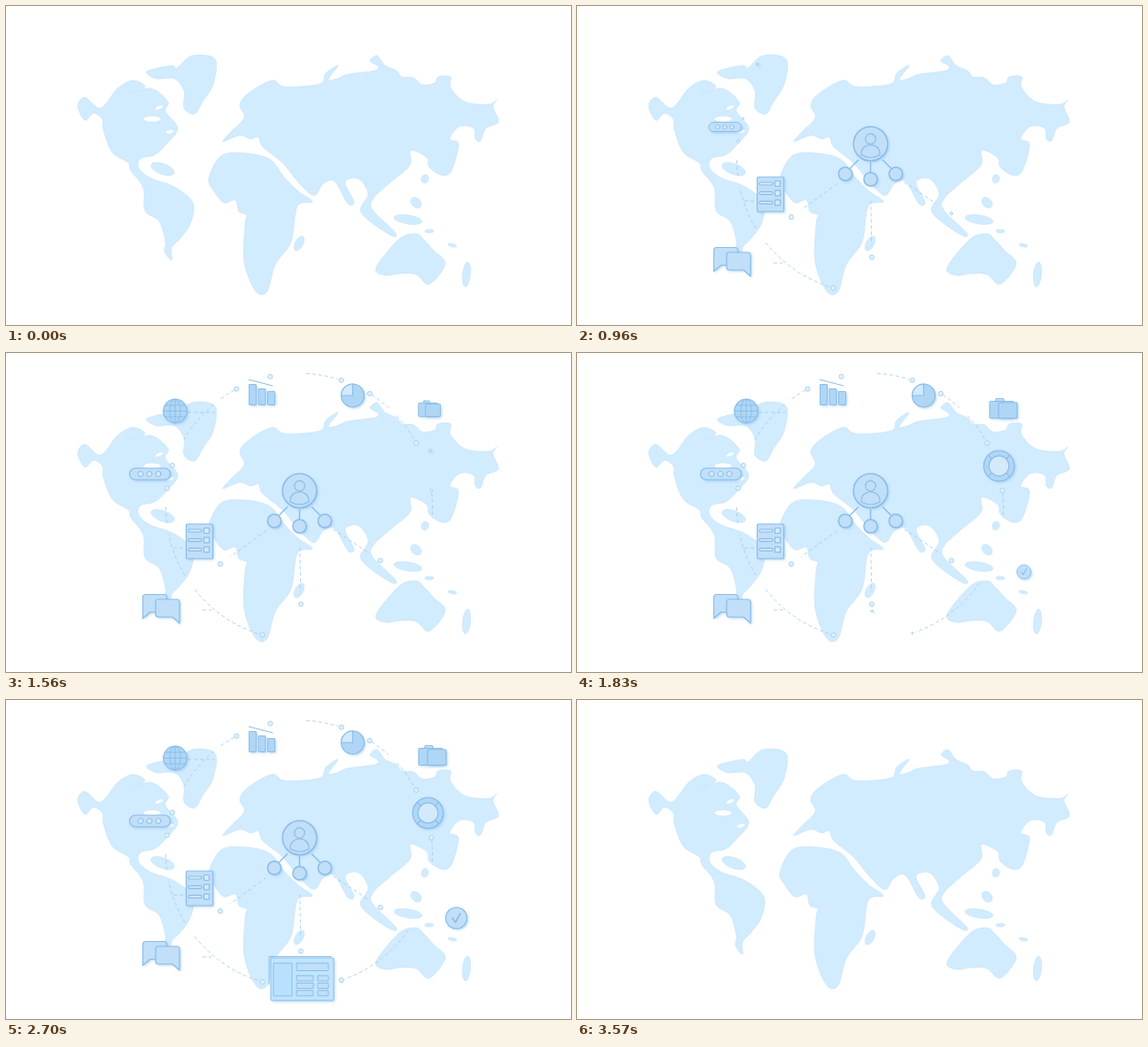
These frames come from a looping animation (638x360 px, 3600 ms). An HTML page with a canvas:

```html
<!DOCTYPE html>
<html lang="en">
<head>
<meta charset="utf-8">
<title>Connected world</title>
<style>
  html, body { margin: 0; width: 100%; height: 100%; overflow: hidden; background: #fff; }
  canvas { display: block; width: 638px; height: 360px; }
</style>
</head>
<body>
<canvas id="stage" width="638" height="360"></canvas>
<script>
const ctx = document.getElementById("stage").getContext("2d");
const LOOP = 3600, FIRST = 84, STEP = 150, GROW = 440, LEAVE = 3073;
const LAND = "#d1ebff", COAST = "#c6e2f7", EDGE = "#8abde8", LINK = "#a6cdec";
const FILL = "#c1dff8", DEEP = "#b0d6f6", PALE = "#d3eafc";

const clamp = v => Math.max(0, Math.min(1, v));
const easeInOut = p => p < 0.5 ? 4 * p ** 3 : 1 - 4 * (1 - p) ** 3;
const progress = (t, start, length) => easeInOut(clamp((t - start) / length));

// Key points of each coast, joined by a smooth closed curve.
const lands = [
  `245,153 254,142 269,126 264,112 273,99 300,84 315,91 354,88 361,76 375,67 364,83 374,82 386,77 416,73 420,68
   411,62 419,56 428,67 441,73 447,80 460,81 470,89 484,87 488,80 502,80 502,92 518,108 545,111 554,106 550,114
   556,131 542,138 536,152 530,150 528,138 512,136 501,150 511,156 503,186 492,191 478,182 475,171 457,163 456,180
   433,200 415,217 414,230 440,256 433,258 401,233 409,212 398,195 383,199 393,221 386,223 371,198 358,201 348,214
   332,201 312,177 290,159 285,148 276,150 264,146`,
  `187,287 179,277 180,266 173,243 157,231 155,205 141,186 138,177 120,165 110,140 109,128 99,121 89,129 81,113
   89,103 104,115 113,110 126,93 143,84 157,91 140,99 164,93 183,108 180,119 194,138 181,156 168,168 152,172
   150,183 163,194 190,204 211,222 208,246 196,263 187,273`,
  "159,74 187,67 193,70 210,56 236,60 234,88 222,108 213,122 201,115 201,96 190,82 170,82",
  `229,195 243,169 270,166 298,173 314,193 330,209 346,221 329,226 322,266 304,292 295,322 282,322 269,289
   270,246 272,236 263,232 259,219 246,222 235,209`,
  "418,295 444,263 463,257 472,264 483,276 496,291 478,314 463,303 445,302 428,304"
].map(smoothPath);
// Ellipses: x, y, radii, tilt
const islands = [
  [177, 184, 14, 6, 0.35], [331, 268, 4.5, 9, 0.5], [520, 303, 4.5, 14, 0.1], [454, 241, 16, 5, 0.15],
  [463, 222, 7, 5, 0.8], [473, 195, 4, 5, 0.3], [478, 254, 5, 2, 0], [504, 270, 5, 1.8, 0.2]
].map(ovalPath);
const lakes = [[165, 127.5, 10, 3.5, 0], [173, 114.5, 5, 2.2, -0.4], [185, 142, 5, 2.2, -0.2]].map(ovalPath);

function smoothPath(text) {
  const points = text.split(/\s+/).map(pair => pair.split(",").map(Number));
  const n = points.length, path = new Path2D();
  const at = i => points[(i + n) % n];
  path.moveTo(...at(0));
  for (let i = 0; i < n; i++) {
    const [a, b, c, d] = [at(i - 1), at(i), at(i + 1), at(i + 2)];
    path.bezierCurveTo(b[0] + (c[0] - a[0]) / 6, b[1] + (c[1] - a[1]) / 6,
      c[0] - (d[0] - b[0]) / 6, c[1] - (d[1] - b[1]) / 6, c[0], c[1]);
  }
  path.closePath();
  return path;
}
function ovalPath([x, y, rx, ry, tilt]) {
  const path = new Path2D();
  path.ellipse(x, y, rx, ry, tilt, 0, 7);
  return path;
}

function drawMap() {
  ctx.lineWidth = 0.6;
  ctx.strokeStyle = COAST;
  for (const [paths, colour] of [[lands, LAND], [islands, LAND], [lakes, "#fff"]]) {
    ctx.fillStyle = colour;
    for (const path of paths) { ctx.fill(path); ctx.stroke(path); }
  }
}

// Shape helpers
function paint(fill, shadow) {
  if (fill) {
    ctx.save();
    if (shadow) {
      ctx.shadowColor = "rgba(110,175,230,.5)";
      ctx.shadowBlur = 3;
      ctx.shadowOffsetX = ctx.shadowOffsetY = 1.5;
    }
    ctx.fillStyle = fill;
    ctx.fill();
    ctx.restore();
  }
  ctx.stroke();
}
function disc(x, y, r, fill, shadow) {
  ctx.beginPath();
  ctx.arc(x, y, r, 0, 7);
  paint(fill, shadow);
}
function box(x, y, w, h, r, fill, shadow) {
  ctx.beginPath();
  ctx.roundRect(x, y, w, h, r);
  paint(fill, shadow);
}
function stroke(...xy) {
  ctx.beginPath();
  for (let i = 0; i < xy.length; i += 2) ctx.lineTo(xy[i], xy[i + 1]);
  ctx.stroke();
}

function drawTeam() {
  ctx.lineWidth = 1.5;
  for (const side of [-1, 0, 1]) {
    const x = 331.5 + side * 28.5, y = side ? 189.5 : 195.5;
    stroke(331.5 + side * 14, side ? 174 : 177, x - side * 6, y - 7);
    disc(x, y, 7.6, FILL, true);
  }
  disc(331.5, 155.5, 19.3, FILL, true);
  ctx.lineWidth = 1.2;
  disc(331.5, 150, 5.8);
  ctx.beginPath();
  ctx.moveTo(321, 168);
  ctx.bezierCurveTo(320, 153, 343, 153, 342, 168);
  ctx.quadraticCurveTo(331.5, 174, 321, 168);
  ctx.stroke();
}
function bubble(x, y, flip) {
  ctx.save();
  ctx.translate(x, y);
  ctx.scale(flip, 1);
  ctx.beginPath();
  ctx.moveTo(0, 27);
  ctx.arcTo(0, 0, 27, 0, 3);
  ctx.arcTo(27, 0, 27, 20, 3);
  ctx.arcTo(27, 20, 9, 20, 3);
  ctx.lineTo(8, 20);
  ctx.closePath();
  paint(FILL, true);
  ctx.restore();
}
function drawChat() {
  bubble(154.5, 272.5, 1);
  bubble(196, 278, -1);
}
function drawList() {
  box(203.5, 193, 30, 39, 1, FILL, true);
  for (let row = 0; row < 3; row++) {
    const y = 200.5 + row * 10.7;
    box(206, y - 1.5, 15, 3, 1.5, PALE);
    box(223.5, y - 3, 6, 6, 0.5, PALE);
  }
}
function drawField() {
  box(139.5, 130, 46, 13, 6.5, FILL, true);
  ctx.lineWidth = 1;
  for (const x of [152, 162, 172]) disc(x, 136.5, 3, PALE);
}
function drawGlobe() {
  disc(191, 65.5, 13.3, DEEP, true);
  ctx.lineWidth = 0.9;
  ctx.beginPath();
  ctx.ellipse(191, 65.5, 6, 13.3, 0, 0, 7);
  ctx.stroke();
  stroke(191, 52, 191, 79);
  for (const dy of [-6.5, 0, 6.5]) {
    const half = Math.sqrt(13.3 ** 2 - dy ** 2);
    stroke(191 - half, 65.5 + dy, 191 + half, 65.5 + dy);
  }
}
function drawChart() {
  ctx.lineWidth = 1;
  for (const [x, top] of [[274.5, 35.5], [285, 40.5], [295.5, 43.5]]) box(x, top, 8, 58.5 - top, 0.5, DEEP, true);
  stroke(274, 30, 301, 37);
}
function drawPie() {
  disc(391.5, 48, 13, DEEP, true);
  ctx.beginPath();
  ctx.moveTo(391.5, 48);
  ctx.arc(391.5, 48, 13, Math.PI, Math.PI * 1.5);
  ctx.closePath();
  paint(PALE);
}
function drawFolder() {
  box(473, 51.5, 9, 6, 1, FILL);
  box(466, 54.5, 27, 19, 1, DEEP, true);
  box(476, 56, 21, 17.5, 1, DEEP, true);
}
function drawRing() {
  disc(476.5, 127.5, 17.3, DEEP, true);
  disc(476.5, 127.5, 11.3, PALE);
  for (let i = 0; i < 4; i++) {
    const a = Math.PI * (i / 2 + 0.25), c = Math.cos(a), s = Math.sin(a);
    stroke(476.5 + 11.3 * c, 127.5 + 11.3 * s, 476.5 + 17.3 * c, 127.5 + 17.3 * s);
  }
}
function drawCheck() {
  disc(508.5, 246, 12, FILL, true);
  ctx.lineWidth = 1.6;
  stroke(504, 246, 507.5, 251, 513, 241);
}
function drawPanel() {
  ctx.lineWidth = 1;
  box(299, 291, 71, 48, 1, "#c0e5ff", true);
  stroke(297, 321, 297, 289.5, 367, 289.5);
  box(302, 297, 21, 37, 0.5, "#b9e1fe");
  box(328, 297, 36, 8.5, 0.5, FILL);
  for (let row = 0; row < 3; row++) {
    box(328, 311 + row * 8.4, 19, 6, 0.5, FILL);
    box(352, 311 + row * 8.4, 12, 6, 0.5, FILL);
  }
}

// Icons in order of appearance, each growing out of its pivot; a null is a pause.
const icons = [
  [331.5, 137, drawTeam], null, [197, 305, drawChat], [235, 233, drawList], [186, 136.5, drawField],
  [205, 65.5, drawGlobe], [273, 45, drawChart], [382, 36, drawPie], [465, 64, drawFolder],
  [479, 108, drawRing], [497, 249, drawCheck], [333, 290, drawPanel]
];

function drawIcons(t) {
  const left = 1 - progress(t, LEAVE, GROW);
  icons.forEach((icon, i) => {
    const scale = progress(t, FIRST + i * STEP, GROW) * left;
    if (!icon || scale < 0.01) return;
    const [x, y, draw] = icon;
    ctx.save();
    ctx.translate(x, y);
    ctx.scale(scale, scale);
    ctx.translate(-x, -y);
    ctx.strokeStyle = EDGE;
    ctx.lineWidth = 1.2;
    ctx.lineJoin = ctx.lineCap = "round";
    draw();
    ctx.restore();
  });
}

// Dashed ring through the icons, in degrees clockwise from the right.
const RING = { x: 331, y: 173.5, r: 150.5 };
const arcs = [[108, 142], [149, 168], [173, 180], [210, 230], [234, 241], [273, 287], [303, 312],
  [317, 330], [354, 365], [395, 430]];
const knobs = [106, 188, 198, 242, 257.5, 288.5, 302, 331.5, 353, 431.5];
const spokes = [89, 144, 33.5];
const sweepTime = angle => 965 + 3.7 * (angle - 210);
const sweepAngle = t => 210 + (t - 965) / 3.7;

function ringPoint(angle, r = RING.r) {
  const a = angle * Math.PI / 180;
  return [RING.x + r * Math.cos(a), RING.y + r * Math.sin(a)];
}
function drawKnob(point, u) {
  if (u > 0) disc(...point, 2.6 * u, "#e0f1fe");
}

function drawLinks(t) {
  ctx.save();
  ctx.globalAlpha = 1 - clamp((t - 3260) / 240);
  ctx.strokeStyle = LINK;
  ctx.lineWidth = 0.9;
  ctx.setLineDash([4, 3]);
  for (const [from, to] of arcs) {
    const end = Math.min(to, sweepAngle(t));
    if (end <= from) continue;
    ctx.beginPath();
    ctx.arc(RING.x, RING.y, RING.r, from * Math.PI / 180, end * Math.PI / 180);
    ctx.stroke();
  }
  if (t > 700) stroke(189, 220, 203, 220);
  if (t > 850) stroke(222, 290, 232, 290);
  if (t > 1060) stroke(205, 67, 236, 67);
  spokes.forEach((angle, i) => {
    const u = clamp((t - 500 - i * 100) / 300);
    if (u) stroke(...ringPoint(angle, 46), ...ringPoint(angle, 46 + 50 * u));
  });
  ctx.setLineDash([]);
  for (const angle of knobs) drawKnob(ringPoint(angle), clamp((t - sweepTime(angle)) / 120));
  spokes.forEach((angle, i) => drawKnob(ringPoint(angle, 110), clamp((t - 780 - i * 60) / 100)));
  ctx.restore();
}

function frame(now) {
  const t = now % LOOP;
  ctx.fillStyle = "#fff";
  ctx.fillRect(0, 0, 638, 360);
  drawMap();
  drawLinks(t);
  drawIcons(t);
  requestAnimationFrame(frame);
}
requestAnimationFrame(frame);
</script>
</body>
</html>
```
